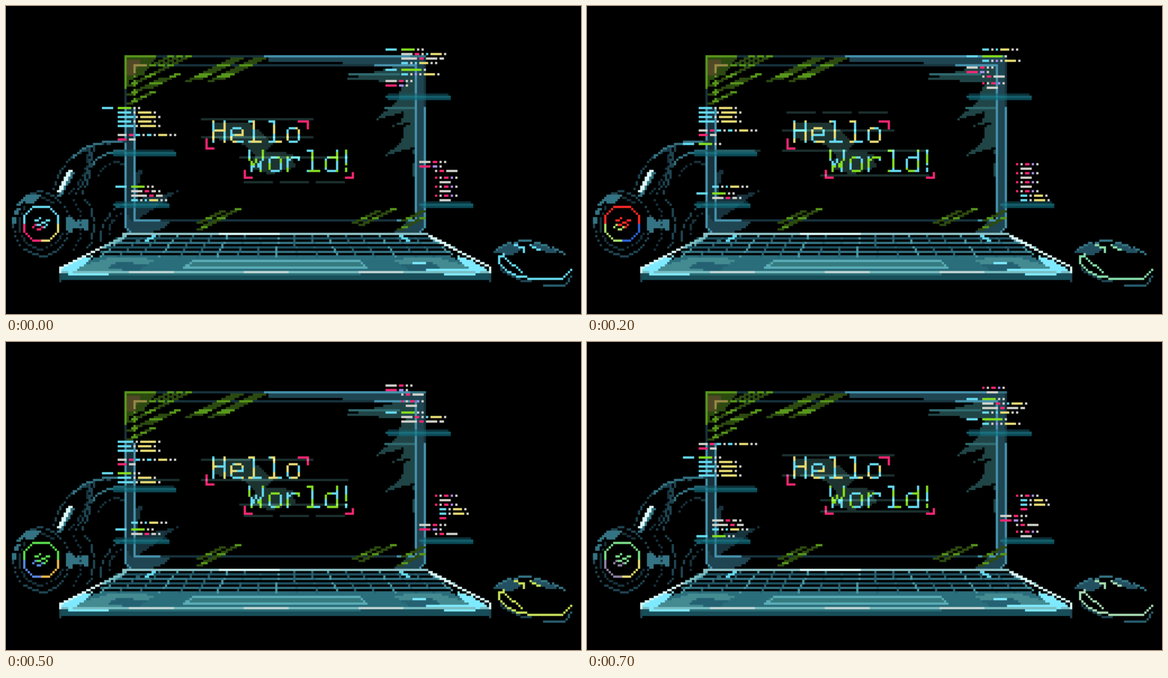
Recreate the animation shown at these times as an HTML page with a canvas. Size 1022 by 548 pixels, loop 800 ms.

```html
<!DOCTYPE html>
<html lang="en">
<head>
<meta charset="utf-8">
<title>Hello World</title>
<style>
html, body { margin: 0; width: 100%; height: 100%; overflow: hidden; background: #000; }
canvas { display: block; }
</style>
</head>
<body>
<canvas id="stage" width="1022" height="548"></canvas>
<script>
const W = 1022, H = 548, CELL = 4, STEP = 100, STEPS = 8;
const stage = document.getElementById('stage').getContext('2d');
const layer = () => Object.assign(document.createElement('canvas'), { width: W, height: H }).getContext('2d');
const backdrop = layer(), scene = layer();
let ctx = backdrop;

const ink = {
  c: '#66d9ef', g: '#84dc22', w: '#d2d2cc', y: '#e6db74', p: '#f92672', v: '#ae91f5',
  deep: '#17333d', dark: '#1f4552', mid: '#347383', blue: '#4692ac', pale: '#7feaff',
  shade: '#204546', moss: '#2c4a10', leaf: '#57961b', snow: '#d9f8f6', steel: '#79bdc1'
};

function randomizer(seed) {
  return () => (seed = (seed * 16807) % 2147483647) / 2147483647;
}

// All shapes snap to a grid of 4px cells.
const col = x => Math.round((x - 4) / CELL);
const row = y => Math.round((y - 1) / CELL);

function cells(c, r, n, color) {
  ctx.fillStyle = color;
  ctx.fillRect(c * CELL + 2, r * CELL - 1, n * CELL, CELL);
}
function bar(color, x0, x1, y, rows = 1) {
  ctx.fillStyle = color;
  ctx.fillRect(x0, y - 2, x1 - x0, rows * CELL);
}
function line(color, pts, thick = 1, gap = 0) {
  for (let i = 2; i < pts.length; i += 2) {
    const c0 = col(pts[i - 2]), r0 = row(pts[i - 1]);
    const dc = col(pts[i]) - c0, dr = row(pts[i + 1]) - r0;
    const n = Math.max(Math.abs(dc), Math.abs(dr), 1);
    for (let k = 0; k <= n; k++) {
      const c = c0 + Math.round(dc * k / n), r = r0 + Math.round(dr * k / n);
      if (gap && (c + 2 * r) % gap === 0) continue;
      cells(c, r, thick, typeof color === 'function' ? color(c, r) : color);
    }
  }
}
function poly(color, pts) {
  for (let r = 0; r < H / CELL; r++) {
    const y = r * CELL + 1, hits = [];
    for (let i = 0; i < pts.length; i += 2) {
      const j = (i + 2) % pts.length, ya = pts[i + 1], yb = pts[j + 1];
      if ((ya <= y) !== (yb <= y)) hits.push(pts[i] + (y - ya) / (yb - ya) * (pts[j] - pts[i]));
    }
    hits.sort((a, b) => a - b);
    for (let i = 0; i + 1 < hits.length; i += 2)
      cells(col(hits[i]), r, Math.max(1, col(hits[i + 1]) - col(hits[i])), color);
  }
}
function sample(point, n = 12) {
  return Array.from({ length: n + 1 }, (_, i) => point(i / n)).flat();
}
function arc(color, cx, cy, rx, ry, from, to, thick, gap) {
  line(color, sample(t => {
    const a = (from + (to - from) * t) * Math.PI / 180;
    return [cx + rx * Math.cos(a), cy + ry * Math.sin(a)];
  }), thick, gap);
}
function curve(color, x0, y0, cx, cy, x1, y1, thick, gap) {
  const bend = (a, b, c, t) => a * (1 - t) ** 2 + 2 * b * t * (1 - t) + c * t * t;
  line(color, sample(t => [bend(x0, cx, x1, t), bend(y0, cy, y1, t)]), thick, gap);
}
const mirror = pts => pts.map((v, i) => i % 2 ? v : 956 - v);
function both(draw, color, pts, ...rest) {
  draw(color, pts, ...rest);
  draw(color, mirror(pts), ...rest);
}

// Diagonal strokes rising two cells per row; every fourth row catches light.
function hatch(x, y, rows) {
  for (let i = 0; i < rows; i++) {
    const r = row(y) - i;
    cells(col(x + 2) + 2 * i, r, 3, r % 4 === 2 || r % 9 === 4 ? ink.leaf : ink.moss);
  }
}
// A torn wedge from a vertical edge out to a tip.
function shard(color, edge, top, bottom, tipX, tipY) {
  const rand = randomizer(tipX), pts = [edge, top];
  for (let t = .25; t < 1; t += .25)
    pts.push(edge + (tipX - edge) * t + 16 * (rand() - .5), top + (tipY - top) * t);
  poly(color, [...pts, tipX, tipY, edge, bottom]);
}

function drawScreen() {
  bar(ink.dark, 466, 742, 93, 2);
  bar(ink.dark, 598, 742, 101);
  bar(ink.dark, 730, 742, 93, 77);
  bar(ink.deep, 214, 226, 181, 55);
  poly(ink.dark, [214, 370, 228, 384, 292, 384, 282, 395, 260, 403, 218, 403]);
  poly(ink.dark, [690, 403, 712, 385, 744, 381, 742, 397, 736, 405]);

  shard(ink.shade, 728, 102, 136, 602, 130);
  shard(ink.shade, 728, 126, 182, 660, 202);
  shard(ink.shade, 728, 176, 204, 688, 214);
  shard(ink.shade, 728, 202, 250, 676, 266);
  shard(ink.shade, 732, 250, 320, 722, 290);
  shard(ink.deep, 230, 346, 384, 308, 328);
  shard(ink.deep, 230, 300, 350, 244, 290);
  bar('#2f6b70', 608, 700, 121);
  bar('#2f6b70', 672, 728, 181);

  bar(ink.deep, 214, 458, 89);
  bar(ink.blue, 458, 718, 89);
  bar(ink.mid, 718, 746, 89);
  for (const y of [105, 381]) {
    bar(ink.deep, 230, 730, y);
    bar(ink.blue, y > 200 ? 694 : 654, 730, y);
  }
  bar(ink.blue, 230, 274, 381);
  line(ink.blue, [212, 181, 212, 393, 220, 401]);
  line(ink.blue, [744, 93, 744, 393, 736, 401]);
  line(ink.blue, [228, 181, 228, 381]);
  line(ink.blue, [728, 105, 728, 381]);
  both(line, ink.deep, [212, 93, 212, 177]);

  poly(ink.moss, [214, 93, 266, 93, 246, 122, 230, 126, 214, 138]);
  poly('#514825', [214, 97, 240, 97, 230, 123, 214, 123]);
  line('#948b45', [228, 117, 228, 105, 248, 105]);
  line(ink.leaf, [212, 145, 212, 89, 264, 89]);
  line(ink.leaf, [228, 125, 228, 169], 1, 4);
  for (let i = 0; i < 3; i++) {
    hatch(214, 173 - 16 * i, 6 + 2 * i);
    hatch(254 + 16 * i, 105, 5);
  }
  hatch(250, 145, 7);
  for (let i = 0; i < 4; i++) hatch(318 + 20 * i, 133 - 4 * (i % 2), 11 - i % 2);
  for (const x of [338, 614]) {
    hatch(x, 385, 6);
    hatch(x + 12, 389, 8);
  }
  hatch(338, 397, 6);
  hatch(694, 397, 6);
  hatch(702, 381, 5);
  poly('#1d3330', [370, 206, 432, 206, 478, 244, 462, 258, 510, 262, 516, 286, 470, 300, 434, 286, 446, 266, 418, 242, 372, 236]);
}

function drawBase() {
  poly('#2a6d7b', [166, 445, 790, 445, 858, 473, 98, 473]);
  both(poly, '#438b91', [110, 470, 190, 446, 270, 450, 230, 470]);
  both(poly, '#246273', [180, 468, 196, 456, 256, 458, 238, 470]);
  poly('#347b80', [330, 453, 626, 453, 642, 466, 314, 466]);

  // Key rows spread out toward the viewer.
  for (let i = 0; i < 4; i++)
    bar(i % 2 ? ink.mid : '#1d5060', 194 - 9 * i, 762 + 9 * i, 413 + 8 * i);
  for (let i = 0; i <= 18; i++)
    line(i % 3 ? '#28606f' : '#4b98a4', [212 + i * 30, 409, 166 + i * 35, 445], 1, 4);
  both(line, ink.c, [262, 405, 246, 417], 2);

  bar('#8fc5c9', 206, 750, 405);
  bar(ink.snow, 378, 486, 405);
  line('#5aadb7', [330, 453, 626, 453, 638, 465, 314, 465, 330, 453]);

  bar('#174e59', 98, 858, 477, 3);
  bar('#286c75', 178, 630, 477);
  bar(ink.steel, 94, 862, 473);
  for (const x of [218, 422, 626]) bar('#c2d7d4', x, x + 80, 473);
  both(poly, ink.pale, [98, 470, 126, 452, 154, 444, 142, 460, 118, 474]);
  both(line, ink.steel, [206, 407, 166, 429], 2);
  both(line, ink.snow, [166, 429, 96, 465, 96, 473]);
  line(ink.snow, [750, 407, 786, 429], 2);
  both(bar.bind(null), ink.dark, []);
  bar(ink.pale, 110, 182, 477);
  bar(ink.pale, 778, 834, 477);
  bar(ink.pale, 722, 746, 457);
  bar(ink.pale, 746, 830, 469);
  both(line, ink.dark, [96, 477, 96, 489]);
}

function drawHeadphones() {
  arc(ink.mid, 62, 387, 50, 58, 180, 250, 2, 7);
  arc(ink.dark, 62, 387, 50, 58, -110, 180, 1, 5);
  arc(ink.deep, 62, 387, 40, 46, 20, 300, 1, 4);
  poly(ink.mid, [34, 350, 46, 334, 66, 334, 50, 350]);
  curve(ink.dark, 82, 325, 110, 241, 210, 241, 1, 5);
  curve(ink.mid, 118, 269, 140, 241, 202, 241);
  for (let i = 0; i < 3; i++)
    curve(i ? ink.dark : ink.deep, 110 + 12 * i, 333, 152, 297, 142 + 6 * i, 253, 1, 5);
  curve(ink.mid, 154, 281, 170, 257, 210, 257);
  curve(ink.deep, 162, 301, 178, 269, 210, 281, 1, 4);
  line(ink.mid, [90, 337, 114, 297], 2);
  line(ink.snow, [92, 329, 112, 293], 2);
  poly(ink.mid, [106, 374, 120, 374, 124, 382, 146, 378, 146, 398, 124, 394, 118, 402, 106, 400]);
  arc(ink.dark, 126, 389, 30, 50, -65, 65, 1, 5);
  arc(ink.deep, 112, 389, 20, 46, -70, 70, 1, 4);
  curve(ink.dark, 168, 417, 170, 365, 208, 353, 1, 6);
  curve(ink.deep, 182, 405, 184, 377, 206, 369, 1, 5);
}

function drawMouse() {
  poly('#235061', [864, 440, 884, 424, 908, 422, 918, 434, 900, 442]);
  poly('#235061', [930, 424, 958, 422, 982, 438, 962, 438]);
  curve(ink.mid, 866, 437, 920, 397, 992, 441, 1, 7);
  curve(ink.dark, 878, 465, 894, 485, 930, 489);
  line('#275d6c', [956, 497, 990, 497, 1004, 481]);
}

function drawGlow() {
  for (const [x, y] of [[186, 257], [190, 349], [674, 157], [734, 349]]) {
    const end = x + (x < 190 ? 116 : x < 200 ? 100 : x < 700 ? 116 : 96);
    bar('rgba(20,90,105,.55)', x + 4, end - 4, y);
    bar('rgba(26,125,140,.75)', x, end, y + 4);
    bar('rgba(16,105,120,.7)', x + 4, end, y + 8);
  }
}

// Code lines: colour letter and length per run, one cell apart; each ">" indents.
const code = {
  head: 'c5 >g6 w w', wide: 'c5 >g9 w',
  pair: '>c6 w y6 w', longPair: '>c7 w y7 w', set: '>c3 w c y4 w w', map: '>c3 w v w y5 w',
  chain: '>w4 p2 c2 w c2 w y4 w w', short: '>p4 w3',
  test: '>w5 p2 w2 w', join: '>w7 p2 w3', query: '>w5 p2 w c y5 w', fetch: '>w7 p2 w5 w2',
  call: 'w5 p2 w w', param: 'p5 v2 w', args: '>w p2 w5', item: '>p w p2 v w',
  block: '>>w5', key: '>>c3 w y4 w', longKey: '>>c3 w y5 w', end: '>>p3'
};
const snap = (v, unit) => Math.floor(v / unit) * unit;

// In each script a word is one 8px line and "/" is a 4px gap.
const panels = [
  { x: 170, y: 181, top: 177, bottom: 249,
    script: 'head pair longPair pair longPair / / chain short / /',
    scroll: t => snap(4 * t + 5 * Math.max(0, t - 5) ** 2, 4) },
  { x: 194, y: 321, top: 317, bottom: 345,
    script: 'head test join set /',
    scroll: t => 12 * t },
  { x: 674, y: 77, top: 73, bottom: 145,
    script: 'head query fetch set / wide map / call param args / item block /',
    scroll: t => snap(12 * t, 8) },
  { x: 734, y: 277, top: 273, bottom: 345,
    script: 'call param args / item block item block item block item key longKey end /',
    scroll: t => snap(Math.min(12 * t, 8 * t + 24) + 4, 8) }
];

function drawRuns(runs, left, y) {
  let x = left;
  for (const run of runs.split(' ')) {
    const name = run.replace(/>/g, ''), depth = run.length - name.length;
    if (depth) x = left + (5 + 2 * depth) * CELL;
    const width = (+name.slice(1) || 1) * CELL;
    bar(ink[name[0]], x, x + width, y);
    x += width + CELL;
  }
}
function drawPanel({ x, y, top, bottom, script, scroll }, step) {
  const words = script.split(' ');
  const height = word => word === '/' ? 4 : 8;
  const period = words.reduce((sum, word) => sum + height(word), 0);
  let at = y - scroll(step);
  while (at > top) at -= period;
  while (at <= bottom) {
    for (const word of words) {
      if (code[word] && at >= top && at <= bottom) drawRuns(code[word], x, at);
      at += height(word);
    }
  }
}

// Letter strokes in cells; each glyph is 6 wide and 10 tall.
const bowl = [1, 3, 4, 3, 5, 4, 5, 8, 4, 9, 1, 9, 0, 8, 0, 4, 1, 3];
const glyphs = {
  H: [[0, 0, 0, 9], [5, 0, 5, 9], [0, 4, 5, 4]],
  e: [[1, 6, 5, 6, 5, 4, 4, 3, 1, 3, 0, 4, 0, 8, 1, 9, 5, 9]],
  l: [[0, 0, 2, 0, 2, 9], [0, 9, 5, 9]],
  o: [bowl],
  W: [[0, 0, 1, 9, 3, 4, 5, 9, 6, 0]],
  r: [[0, 3, 0, 9], [0, 5, 2, 3, 5, 3, 5, 4]],
  d: [bowl, [5, 0, 5, 9]],
  '!': [[0, 0, 0, 6], [0, 8, 0, 9]]
};
function drawWord(word, x, y, pitch, accent, step) {
  const color = (c, r) => Math.sin(c * .55 + r * .8 + step * 1.7) > .1 ? accent : ink.c;
  [...word].forEach((ch, i) => {
    for (const stroke of glyphs[ch])
      line(color, stroke.map((v, k) => v * CELL + (k % 2 ? y : x + Math.round(i * pitch) * CELL)));
  });
}
function drawBrackets() {
  line(ink.p, [520, 205, 536, 205, 536, 217]);
  line(ink.p, [356, 237, 356, 253, 368, 253]);
  line(ink.p, [424, 293, 424, 305, 436, 305]);
  line(ink.p, [604, 305, 616, 305, 616, 297]);
}

function drawScans(step) {
  const color = '#1b302e';
  ctx.globalCompositeOperation = 'lighter';
  for (const base of [201, 233, 269, 313, 333]) {
    const y = base - (step && 4 * step + 4);
    if (y < 189 || y > 313) continue;
    const left = y < 260 ? 346 : 414, right = y < 245 ? 546 : 608;
    if (y > 189 && y < 309) bar(color, left, right, y);
    else for (let x = left + 8; x < right; x += 64) bar(color, x, Math.min(x + 52, right), y);
    if (y > 238 && y < 260) bar(color, 230, 308, y);
  }
  ctx.globalCompositeOperation = 'source-over';
}

// Each light cycles through four colours, two steps apart.
const rgb = hex => [1, 3, 5].map(i => parseInt(hex.slice(i, i + 2), 16));
function cycle(colors, step) {
  const i = Math.floor(step / 2), f = step / 2 - i;
  const a = rgb(colors[i]), b = rgb(colors[(i + 1) % colors.length]);
  return `rgb(${a.map((v, k) => Math.round(v + (b[k] - v) * f))})`;
}
const lights = {
  top: ['#66d9ef', '#f92a26', '#22d97a', '#8ee020'],
  left: ['#f92672', '#a6e06a', '#9630ee', '#22ddd8'],
  right: ['#e6db74', '#2a62d8', '#f0902a', '#e6db74'],
  mouse: ['#66d9ef', '#86ddab', '#a6e23e', '#e6db74']
};

function drawLights(step) {
  const [top, left, right, mouse] = Object.values(lights).map(colors => cycle(colors, step));
  line(top, [32, 385, 32, 373, 48, 357, 76, 357, 92, 373, 92, 385]);
  line(left, [32, 389, 32, 401, 48, 417, 60, 417]);
  line(right, [64, 417, 76, 417, 92, 401, 92, 389]);
  line(top, [52, 381, 60, 377]);
  line(top, [56, 389, 76, 381]);
  line(top, [64, 393, 72, 389]);
  line(left, [48, 393, 52, 389]);
  line(left, [56, 397, 64, 393]);

  line(mouse, [884, 441, 876, 445, 876, 457, 892, 473, 912, 481, 940, 485, 988, 485, 1004, 469]);
  line(mouse, [884, 445, 916, 473]);
  line(mouse, [904, 425, 918, 429, 920, 437]);
  line(mouse, [932, 425, 948, 433]);
}

drawScreen();
drawBase();
drawHeadphones();
drawMouse();
drawGlow();
ctx = scene;

function render() {
  const step = Math.floor(performance.now() / STEP) % STEPS;
  ctx.fillStyle = '#000';
  ctx.fillRect(0, 0, W, H);
  ctx.drawImage(backdrop.canvas, 0, 0);
  drawWord('Hello', 368, 205, 8.2, ink.y, step);
  drawWord('World!', 432, 257, 8.5, ink.g, step);
  drawBrackets();
  drawScans(step);
  panels.forEach(panel => drawPanel(panel, step));
  drawLights(step);
  // The grid sits half a pixel off the screen's own pixels.
  stage.fillStyle = '#000';
  stage.fillRect(0, 0, W, H);
  stage.drawImage(scene.canvas, .5, .5);
  requestAnimationFrame(render);
}
render();
</script>
</body>
</html>
```
